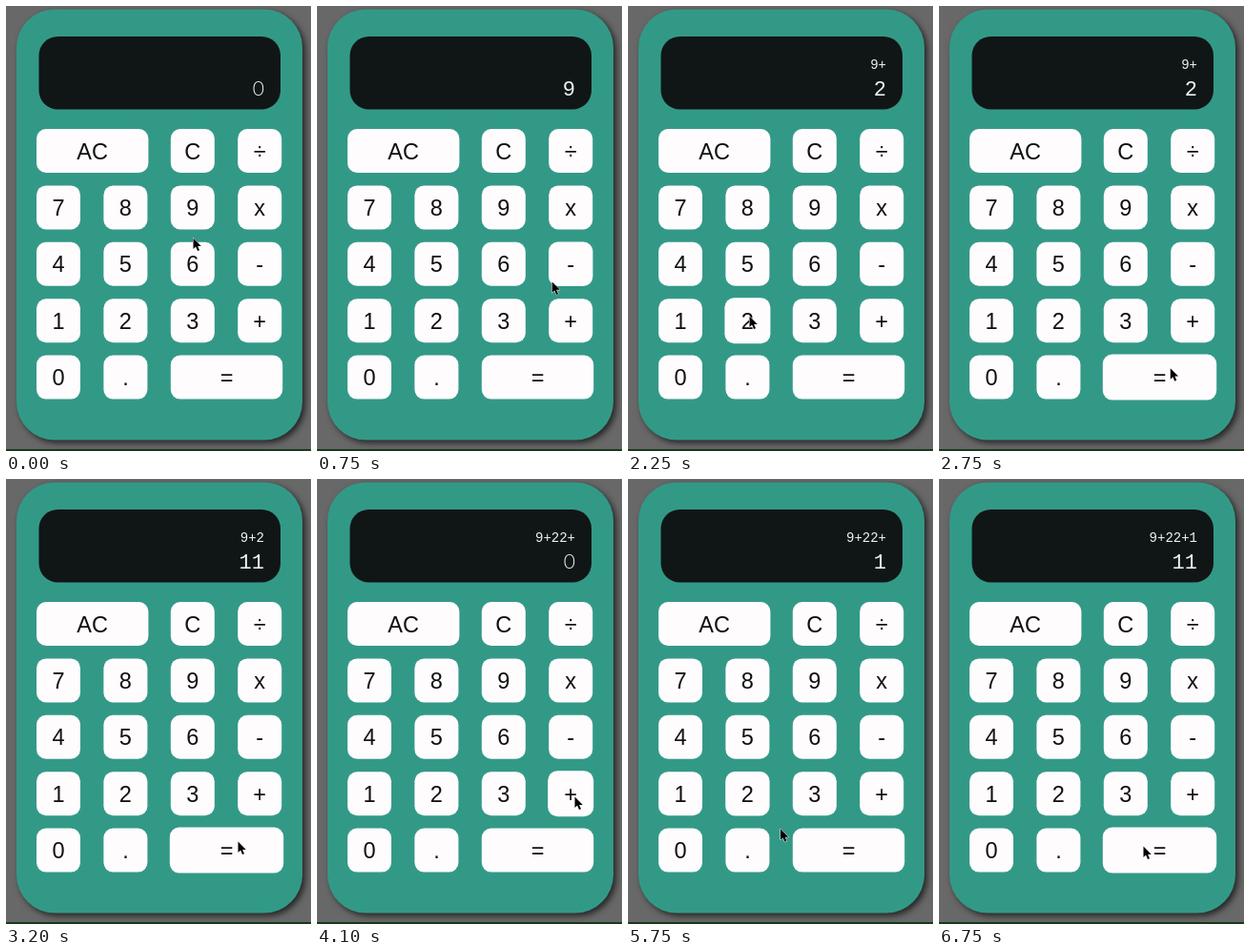
These frames come from a looping animation (320 px wide and 467 px high, 7420 ms). An HTML page:

```html
<!DOCTYPE html>
<html lang="en">
<head>
<meta charset="utf-8">
<title>Calculator</title>
<style>
  html, body { margin: 0; width: 100%; height: 100%; overflow: hidden; background: #686868; }
  svg { display: block; width: 100vw; height: 100vh; }
  .body { fill: #339987; filter: drop-shadow(3px 3px 3px rgba(0, 0, 0, .65)); }
  .key { fill: #fffcfe; }
  .label { font: 23.5px "Liberation Sans", Arial, sans-serif; fill: #101010; text-anchor: middle; }
  .screen { font-family: "Liberation Mono", "Courier New", monospace; fill: #eef5f1; text-anchor: end; }
  .sum { font-size: 14px; }
  .value { font-size: 22px; }
  .zero { font: 300 21px Lato, sans-serif; }
  .cursor { fill: #000; stroke: #fff; stroke-width: 1; paint-order: stroke; stroke-linejoin: round; }
</style>
</head>
<body>
<svg viewBox="0 0 320 467" preserveAspectRatio="none">
  <rect y="465" width="320" height="2" fill="#173a1a"/>
  <rect class="body" x="11" y="3.5" width="300" height="452" rx="40"/>
  <rect x="34.5" y="32" width="253.5" height="76.5" rx="20" fill="#101616"/>
  <g id="keys"></g>
  <text id="sum" class="screen sum" x="271" y="66"></text>
  <text id="value" class="screen value" x="271" y="94"></text>
  <path id="cursor" class="cursor" d="M.5 .5V12L3.1 9.6 5 14 7 13.2 5.1 8.9H8.8Z"/>
</svg>
<script>
const LOOP = 7420;
const $ = id => document.getElementById(id);

// label, column, row, width in columns
const layout = [
  ["AC", 0, 0, 2], ["C", 2, 0], ["÷", 3, 0],
  ["7", 0, 1], ["8", 1, 1], ["9", 2, 1], ["x", 3, 1],
  ["4", 0, 2], ["5", 1, 2], ["6", 2, 2], ["-", 3, 2],
  ["1", 0, 3], ["2", 1, 3], ["3", 2, 3], ["+", 3, 3],
  ["0", 0, 4], [".", 1, 4], ["=", 2, 4, 2]
];

// start, end, x, y: the pointer glides to (x, y) between the two times
const moves = [
  [30, 230, 199, 210],
  [470, 930, 270, 329],
  [930, 1180, 270, 333],
  [1450, 2080, 127, 325],
  [2360, 2770, 243, 380],
  [3510, 3920, 270, 333],
  [4370, 4980, 58, 333],
  [5450, 5950, 214, 385]
];

// time, expression, value
const screens = [
  [0, "", "0"], [250, "", "9"], [1250, "9+", "0"], [2250, "9+", "2"],
  [2950, "9+2", "11"], [4100, "9+22+", "0"], [5300, "9+22+", "1"], [6450, "9+22+1", "11"]
];

function add(tag, attrs) {
  const el = document.createElementNS("http://www.w3.org/2000/svg", tag);
  for (const name in attrs) el.setAttribute(name, attrs[name]);
  return $("keys").appendChild(el);
}

const keys = layout.map(([label, col, row, span = 1]) => {
  const x = 32 + col * 70.4, y = 129 + row * 59.4, w = 46 + (span - 1) * 71.4, h = 46;
  const rect = add("rect", { class: "key", rx: 10 });
  add("text", { class: "label", x: x + w / 2, y: y + 31.5 }).textContent = label;
  return { x, y, w, h, rect };
});

function pointer(t) {
  let x = 196, y = 243;
  for (const [start, end, toX, toY] of moves) {
    const u = Math.min(1, Math.max(0, (t - start) / (end - start)));
    const k = u * u * (3 - 2 * u);
    x += (toX - x) * k;
    y += (toY - y) * k;
  }
  return [x, y];
}

// Share of the last 100 ms the pointer spent over the key
function hover(key, t) {
  let share = 0;
  for (let i = 0; i < 5; i++) {
    const [x, y] = pointer(t - i * 25);
    if (x >= key.x && x <= key.x + key.w && y >= key.y && y <= key.y + key.h) share += 0.2;
  }
  return share;
}

function draw(t) {
  for (const key of keys) {
    const g = hover(key, t);
    const box = { x: key.x - g, y: key.y - g, width: key.w + 2 * g, height: key.h + 2 * g };
    for (const name in box) key.rect.setAttribute(name, box[name]);
  }
  const [, sum, value] = screens.findLast(s => s[0] <= t);
  $("sum").textContent = sum;
  $("value").textContent = value;
  $("value").classList.toggle("zero", value === "0");
  $("cursor").setAttribute("transform", `translate(${pointer(t)})`);
}

function frame() {
  draw(performance.now() % LOOP);
  requestAnimationFrame(frame);
}
frame();
</script>
</body>
</html>
```
